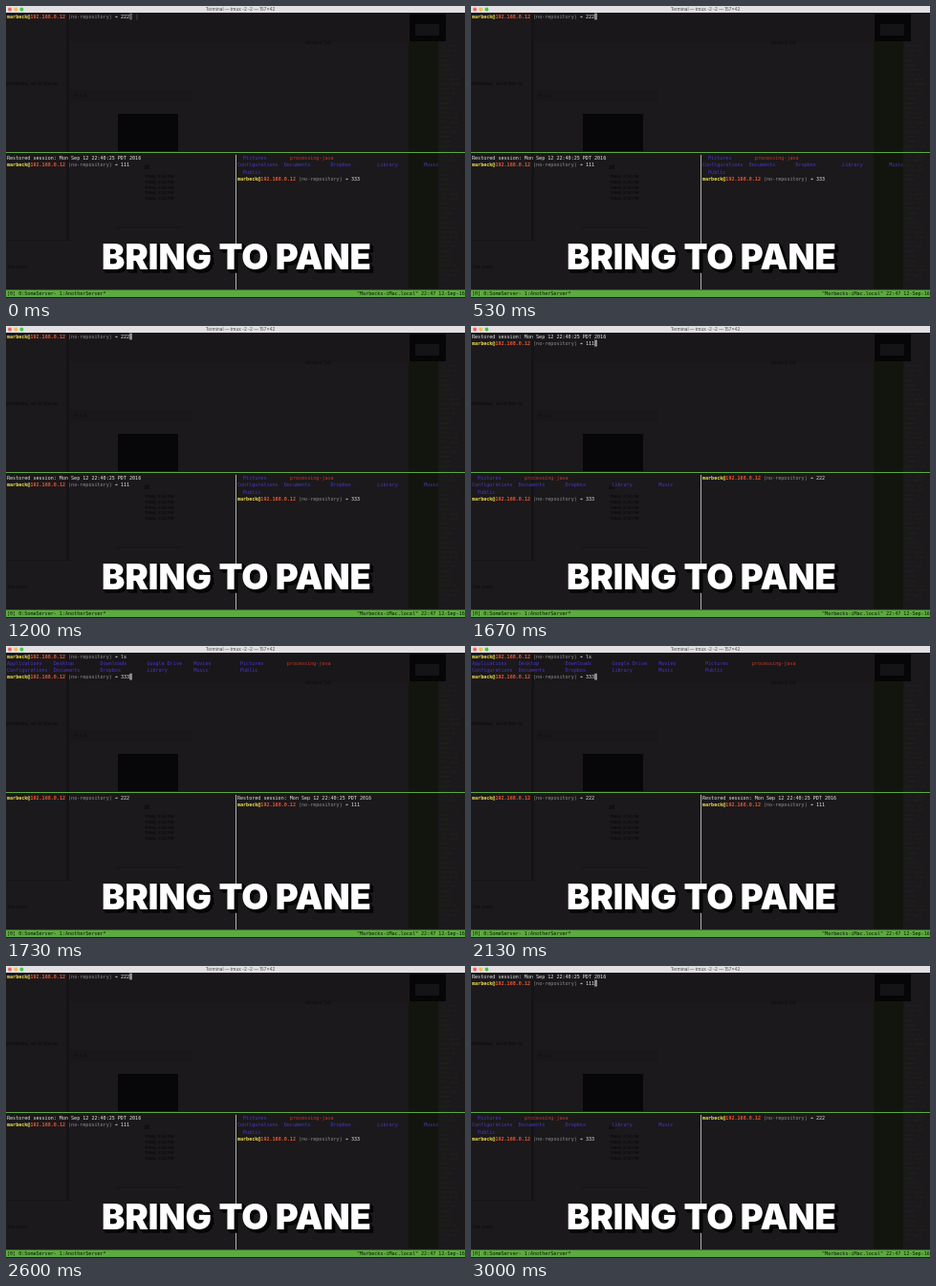
Animation, 480 px wide and 306 px high, one loop 3070 ms. Source, as an HTML page with a canvas:

```html
<!DOCTYPE html>
<html lang="en">
<head>
<meta charset="utf-8">
<title>Bring to pane</title>
<style>
html, body { margin: 0; width: 100%; height: 100%; overflow: hidden; background: #1b191c; }
canvas { display: block; width: 480px; height: 306px; }
</style>
</head>
<body>
<canvas id="stage" width="480" height="306"></canvas>
<script>
const ctx = document.getElementById('stage').getContext('2d');
const LOOP = 3070;
const CELL_W = 3.05, CELL_H = 7.07, LEFT = 1, TOP = 12.9;
const MONO = '"DejaVu Sans Mono", monospace';
const SANS = 'Inter, "Noto Sans", sans-serif';
const WHITE = '#e4e4e4', GRAY = '#8f8f8f', YELLOW = '#f3e04a',
      RED = '#f2542f', BLUE = '#4a35cf', RUST = '#c23a26', GREEN = '#5bab3e';

// Time at which each pane order starts: [top, lower left, lower right]
const STEPS = [
  [0, ['two', 'one', 'three']],
  [1270, ['one', 'three', 'two']],
  [1730, ['three', 'two', 'one']],
  [2200, ['two', 'one', 'three']],
  [2730, ['one', 'three', 'two']]
];

function box(color, x, y, w, h) {
  ctx.fillStyle = color;
  ctx.fillRect(x, y, w, h);
}

function dot(color, x, y, r) {
  ctx.fillStyle = color;
  ctx.beginPath();
  ctx.arc(x, y, r, 0, 7);
  ctx.fill();
}

function label(str, x, y, size, color, family = SANS, weight = 400) {
  ctx.save();
  ctx.translate(x, y);
  ctx.scale(0.25, 0.25);
  ctx.font = `${weight} ${size * 4}px ${family}`;
  ctx.fillStyle = color;
  ctx.fillText(str, 0, 0);
  ctx.restore();
}

function cells(str, col, row, color, bold) {
  label(str, LEFT + col * CELL_W, TOP + row * CELL_H, 5.066, color, MONO, bold ? 700 : 400);
}

function prompt(col, row, input) {
  cells('marbeck@', col, row, YELLOW, true);
  cells('192.168.0.12', col + 8, row, RED, true);
  cells('(no-repository)', col + 21, row, GRAY);
  cells('➜', col + 37, row, WHITE);
  cells(input, col + 39, row, WHITE);
}

// Directory names sit on a grid of 16 columns
function list(names, col, row) {
  names.forEach((name, i) =>
    cells(name, col + i * 16, row, name === 'processing-java' ? RUST : BLUE));
}

const PANES = {
  one(col, row) {
    cells('Restored session: Mon Sep 12 22:40:25 PDT 2016', col, row, WHITE);
    prompt(col, row + 1, '111');
    return 1;
  },
  two(col, row) {
    prompt(col, row, '222');
    return 0;
  },
  three(col, row, wide) {
    const last = ['Pictures', 'processing-java'];
    const second = ['Configurations', 'Documents', 'Dropbox', 'Library', 'Music'];
    if (wide) {
      prompt(col, row, 'ls');
      list(['Applications', 'Desktop', 'Downloads', 'Google Drive', 'Movies', ...last], col, row + 1);
      list([...second, 'Public'], col, row + 2);
    } else {
      list(last, col + 2, row);
      list(second, col, row + 1);
      list(['Public'], col + 2, row + 2);
    }
    prompt(col, row + 3, '333');
    return 3;
  }
};

// Desktop showing faintly through the dark terminal
function desktop() {
  box('#1b191c', 0, 7, 480, 299);
  box('#19171a', 66, 8, 355, 29);
  box('#151316', 63, 8, 3, 238);
  box('#161417', 0, 245, 63, 1);
  box('#19171a', 66, 88, 129, 12);
  for (let i = 0; i < 3; i++) dot('#131114', 73 + i * 5, 94, 1.3);
  box('#070608', 117, 113, 63, 39);
  label('windows, so in the m', 0, 83, 5.4, '#0a090b');
  label('window list', 313, 39.5, 5, '#0d0c0e');
  label('the pane', 2, 275, 5, '#0d0c0e');

  box('#171518', 116, 231, 68, 2);
  label('all', 144, 171, 5.6, '#0c0b0d', SANS, 700);
  for (let i = 0; i < 5; i++)
    label('Today, 9:26 PM', 145, 180 + i * 5.8, 4, '#0c0b0d', SANS, 700);

  box('#12150d', 421, 37, 31, 259);
  box('#060507', 422, 8, 38, 29);
  box('#141315', 428, 19, 25, 12);
  const words = ['let pane', 'move to', 'select -t', 'swap', 'list all', 'join -s'];
  for (let i = 0; i < 50; i++) {
    const word = words[(i * 5 + (i >> 2)) % 6];
    label(word, 453 + (i * 7 % 3), 43 + i * 5, 4, '#202a17', MONO);
  }
}

function titleBar() {
  box('#e2e0e2', 0, 0, 480, 7);
  ['#f4605a', '#f6bd3b', '#42c64c'].forEach((color, i) => dot(color, 4 + i * 6.2, 3.5, 1.9));
  label('Terminal — tmux -2 -2 — 157×42', 208.7, 5.2, 4.65, '#484848');
}

function frameLines() {
  box(GREEN, 0, 153, 480, 1);
  box('#aab5a5', 240, 156, 1, 141);
  box(GREEN, 0, 297.5, 480, 7.5);
  box('#1b191c', 0, 305, 480, 1);
  cells('[0] 0:SomeServer- 1:AnotherServer*', 0, 41, '#0b1606');
  cells('"Marbecks-iMac.local" 22:47 12-Sep-16', 120, 41, '#0b1606');
}

function caption() {
  const text = 'BRING TO PANE', x = 241, y = 276;
  ctx.save();
  ctx.font = `900 36.5px ${SANS}`;
  ctx.textAlign = 'center';
  ctx.lineJoin = 'round';
  ctx.lineWidth = 1.5;
  ctx.strokeStyle = ctx.fillStyle = '#050505';
  for (let d = 1; d <= 3; d++) {
    ctx.strokeText(text, x + d, y + d);
    ctx.fillText(text, x + d, y + d);
  }
  ctx.fillStyle = '#fff';
  ctx.fillText(text, x, y);
  ctx.restore();
}

function draw(time) {
  const [top, left, right] = STEPS.filter(step => step[0] <= time).pop()[1];
  desktop();
  titleBar();
  const row = PANES[top](0, 0, true);
  PANES[left](0, 21);
  PANES[right](79, 21);
  box(time < 70 ? '#5c5c5c' : '#919191', LEFT + 42 * CELL_W, 7.6 + row * CELL_H, 2.8, 6.8);
  if (time < 70) box('#4a4a4a', 136.5, 8.5, 0.8, 6);
  frameLines();
  caption();
}

const start = performance.now();
function tick() {
  draw((performance.now() - start) % LOOP);
  requestAnimationFrame(tick);
}
tick();
</script>
</body>
</html>
```
